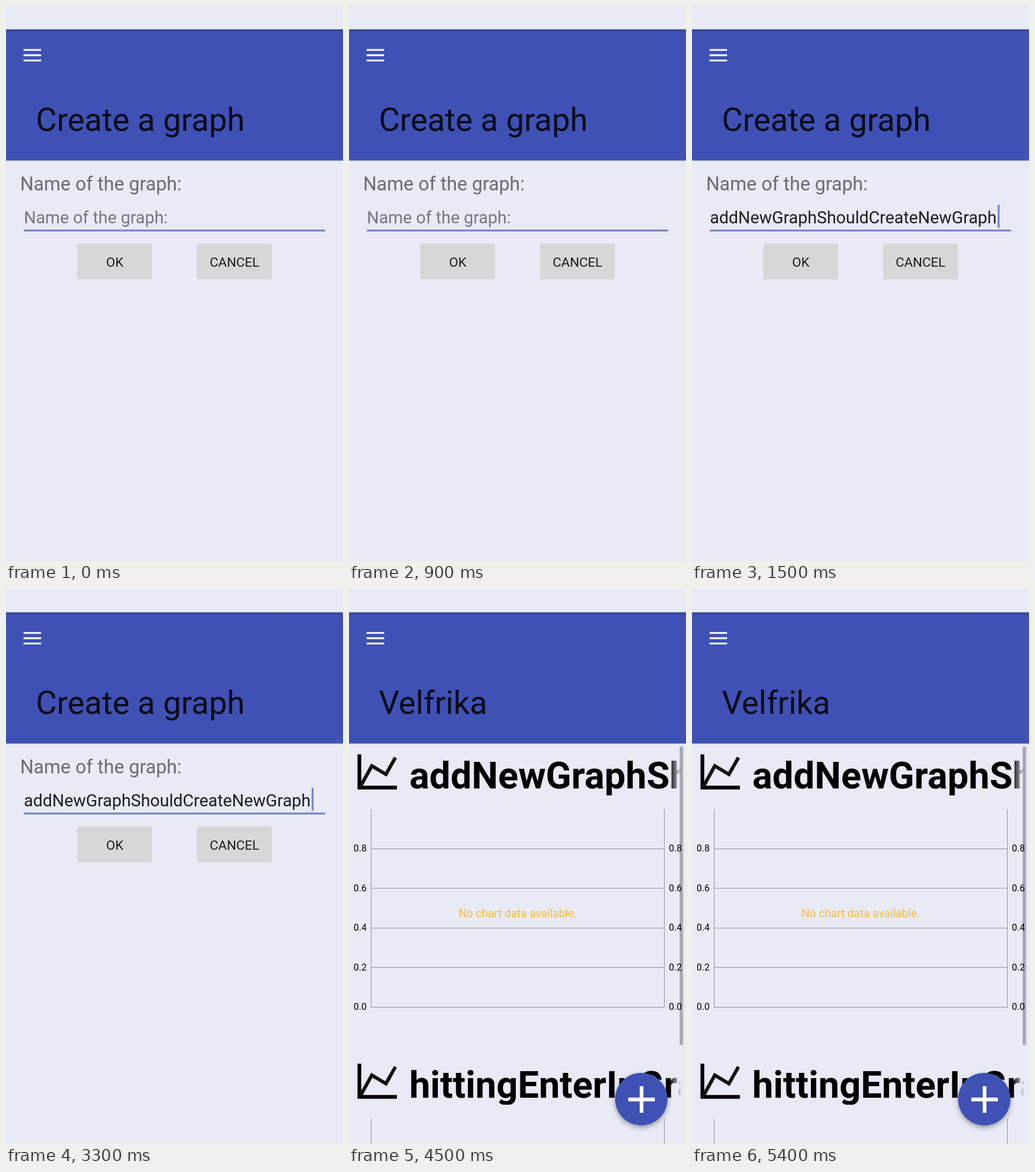
These frames come from a looping animation (584 by 960 pixels, 6000 ms). An HTML page:

```html
<!DOCTYPE html>
<html lang="en">
<head>
<meta charset="utf-8">
<title>Create a graph</title>
<style>
html, body { margin: 0; width: 100%; height: 100%; overflow: hidden; background: #e8eaf6; }
svg { display: block; width: 584px; height: 960px; font-family: Roboto, sans-serif; }
.title { font-size: 55.8px; fill: #090c19; }
.label { font-size: 32.9px; fill: #6b6c73; }
.input { font-size: 29.3px; }
.button { font-size: 22.8px; fill: #1c1c1c; text-anchor: middle; }
.name { font-size: 64.9px; font-weight: 700; }
.tick { font-size: 16.2px; }
</style>
</head>
<body>
<svg id="stage" viewBox="0 0 584 960">
  <defs>
    <linearGradient id="edge" x2="0" y2="1">
      <stop offset="0" stop-color="#000" stop-opacity=".3"/>
      <stop offset=".4" stop-color="#000" stop-opacity=".1"/>
      <stop offset="1" stop-color="#000" stop-opacity="0"/>
    </linearGradient>
    <linearGradient id="fade">
      <stop offset="0" stop-color="#e8eaf6" stop-opacity="0"/>
      <stop offset="1" stop-color="#e8eaf6"/>
    </linearGradient>
    <filter id="blur" x="-30%" y="-30%" width="160%" height="160%">
      <feGaussianBlur stdDeviation="4.5"/>
    </filter>
    <clipPath id="nameBox"><path d="M100 280H576V357H100Z"/></clipPath>
  </defs>

  <rect width="584" height="960" fill="#e8eaf6"/>
  <rect y="40.5" width="584" height="226.9" fill="#3f51b5"/>
  <rect y="40.5" width="584" height="6" fill="url(#edge)"/>
  <path d="M30.4 76H60.8M30.4 85.1H60.8M30.4 94.2H60.8" stroke="#fff" stroke-width="3.1"/>
  <text id="title" class="title" x="51.7" y="216"></text>

  <g id="form">
    <text class="label" x="24.4" y="319">Name of the graph:</text>
    <text id="input" class="input" x="31" y="375.5"></text>
    <rect x="31" y="386.7" width="522" height="3.3" fill="#7986cb"/>
    <rect id="caret" x="529.7" y="344" width="3.3" height="39.5" fill="#7986cb"/>
    <g fill="#d6d7d7">
      <rect x="123.3" y="411" width="129.8" height="61.7" rx="3"/>
      <rect x="331" y="411" width="129.8" height="61.7" rx="3"/>
    </g>
    <text class="button" x="188.5" y="451">OK</text>
    <text class="button" x="396" y="451">CANCEL</text>
  </g>

  <g id="list">
    <g id="cards"></g>
    <rect x="573" y="273" width="6" height="515.5" fill="#000" fill-opacity=".28"/>
    <circle cx="506.5" cy="886" r="45.4" fill-opacity=".36" filter="url(#blur)"/>
    <circle cx="506.5" cy="882.3" r="45.4" fill="#3f51b5"/>
    <path d="M484 883H530M507 860V906" stroke="#fff" stroke-width="6.4"/>
  </g>
</svg>
<script>
const $ = id => document.getElementById(id);
const graphName = "addNewGraphShouldCreateNewGraph";
const hint = "Name of the graph:";

function chart() {
  let out = '<path d="M38.5 381V723.5M546.5 381V723.5" stroke="#8f9098"/>';
  for (let i = 0; i < 5; i++) {
    const y = 723 - 68.5 * i;
    const value = (i * 0.2).toFixed(1);
    out += `<path d="M38 ${Math.floor(y) + 0.5}H547" stroke="#8f9098"/>
      <text class="tick" x="30.5" y="${y + 5}" text-anchor="end">${value}</text>
      <text class="tick" x="554.3" y="${y + 5}">${value}</text>`;
  }
  return out + `<text x="292.3" y="568" font-size="19.5" fill="#f7bd33"
    text-anchor="middle">No chart data available.</text>`;
}

function card(name, y) {
  return `<g transform="translate(0 ${y})">
    <path d="M18 286V343.5H83" fill="none" stroke="#000" stroke-width="6.5"/>
    <path d="M19 343L39.5 306L64 320.5L80.5 291.5" fill="none" stroke="#111" stroke-width="6"/>
    <g clip-path="url(#nameBox)">
      <text class="name" x="104.5" y="345">${name}</text>
      <rect x="555" y="280" width="21" height="77" fill="url(#fade)"/>
    </g>
    ${chart()}
  </g>`;
}

$("cards").innerHTML = card(graphName, 0) + card("hittingEnterInGraphName", 535);

function show(id, on) {
  $(id).setAttribute("visibility", on ? "visible" : "hidden");
}

function draw(now) {
  const t = now % 6000;
  const typed = t >= 1500;
  const saved = t >= 4500;
  $("title").textContent = saved ? "Velfrika" : "Create a graph";
  $("input").textContent = typed ? graphName : hint;
  $("input").setAttribute("fill", typed ? "#1d1e20" : "#76777d");
  show("form", !saved);
  show("caret", typed && !saved);
  show("list", saved);
}

const start = performance.now();
function tick() {
  draw(performance.now() - start);
  requestAnimationFrame(tick);
}
draw(0);
requestAnimationFrame(tick);
</script>
</body>
</html>
```
